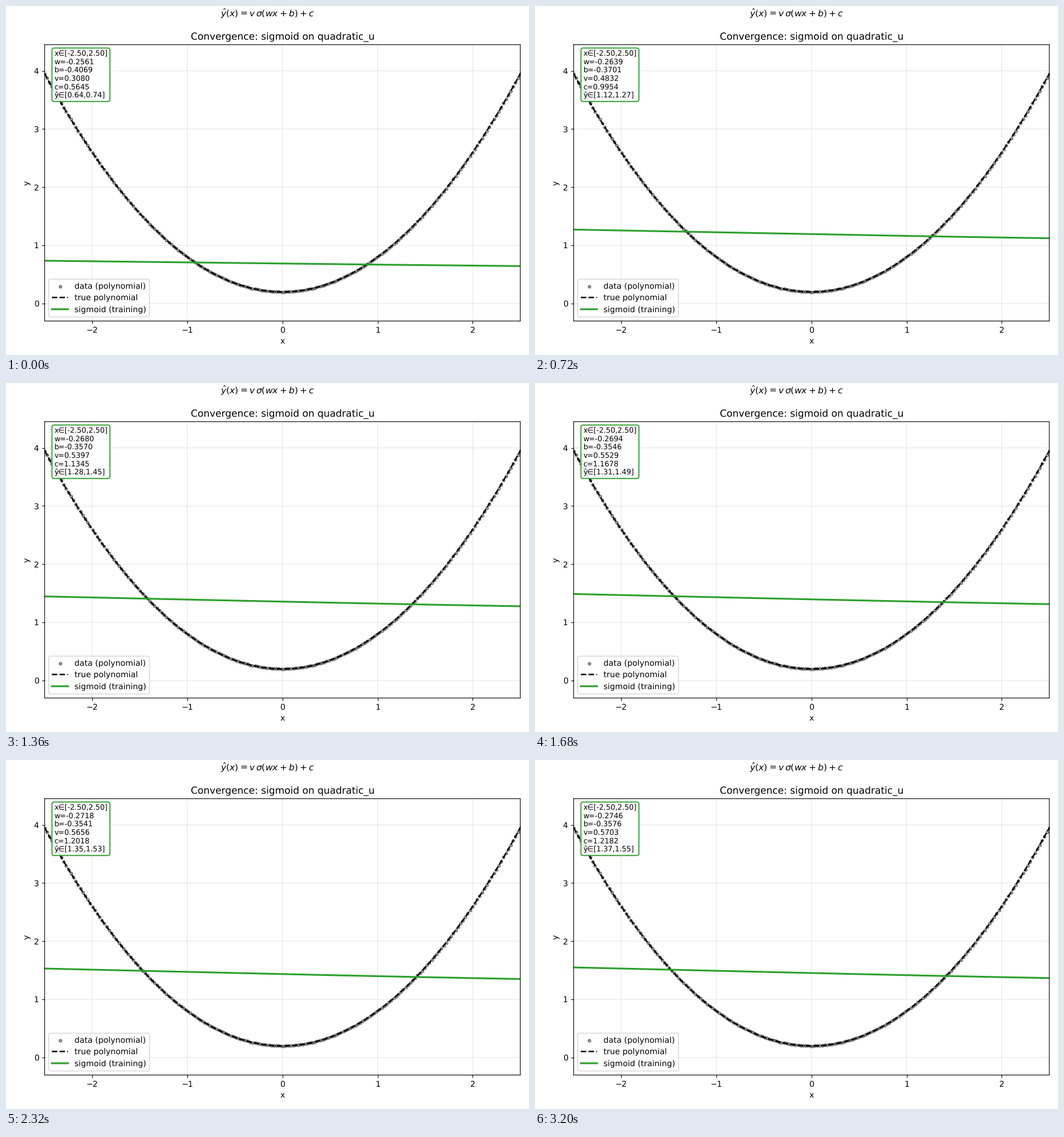
A matplotlib script for the animation above (3280 ms loop, 917 by 611 pixels).

```python
import numpy as np
import matplotlib.pyplot as plt
from matplotlib.animation import FuncAnimation

W, H = 917, 611
DPI = W / 9
FRAMES, INTERVAL = 41, 80
LR, STRIDE = 0.002, 25
START = (-0.2561, -0.4069, 0.3080, 0.5645)  # w, b, v, c
GREEN = "#2ca02c"

plt.rcParams.update({
    "font.family": "DejaVu Sans",
    "text.hinting": "none",
    "path.snap": False,
})

x = np.linspace(-2.5, 2.5, 200)
y = 0.6 * x**2 + 0.2


def sigmoid(z):
    return 1 / (1 + np.exp(-z))


def predict(p):
    w, b, v, c = p
    return v * sigmoid(w * x + b) + c


def train(start):
    """Gradient descent on the mean squared error, logged every STRIDE steps."""
    p = np.array(start)
    log = [p]
    for step in range(1, (FRAMES - 1) * STRIDE + 1):
        w, b, v, c = p
        s = sigmoid(w * x + b)
        err = v * s + c - y
        slope = err * v * s * (1 - s)
        grad = np.array([slope @ x, slope.sum(), err @ s, err.sum()])
        p = p - LR * 2 * grad / x.size
        if step % STRIDE == 0:
            log.append(p)
    return log


path = train(START)

fig = plt.figure(figsize=((W + 1e-6) / DPI, (H + 1e-6) / DPI), dpi=DPI)
left, right, top, bottom = 67.7, 901.7, 67.7, 551.5
ax = fig.add_axes([left / W, 1 - bottom / H,
                   (right - left) / W, (bottom - top) / H])
fig.text(0.5, 1 - 18 / H, r"$\hat{y}(x) = v\,\sigma(wx+b)+c$",
         ha="center", va="baseline", fontsize=11)

ax.scatter(x, y, s=12, color="black", alpha=0.4, label="data (polynomial)")
ax.plot(x, y, "--", color="black", lw=1.8, label="true polynomial")
curve, = ax.plot(x, predict(START), color=GREEN, lw=2.2,
                 label="sigmoid (training)")
ax.set(xlim=(-2.5, 2.5), ylim=(-0.3, 4.45), xlabel="x", ylabel="y",
       xticks=range(-2, 3), yticks=range(5),
       title="Convergence: sigmoid on quadratic_u")
ax.grid(True, alpha=0.3)
ax.legend(loc="lower left")

info = ax.text(0.02, 0.98, "", transform=ax.transAxes, ha="left", va="top",
               fontsize=9,
               bbox=dict(boxstyle="round,pad=0.3", facecolor="white",
                         edgecolor=GREEN, linewidth=1.5, alpha=0.9))


def update(i):
    fit = predict(path[i])
    curve.set_ydata(fit)
    rows = [f"{name}={value:.4f}" for name, value in zip("wbvc", path[i])]
    info.set_text("\n".join([f"x∈[{x[0]:.2f},{x[-1]:.2f}]", *rows,
                             f"ŷ∈[{fit.min():.2f},{fit.max():.2f}]"]))
    return curve, info


anim = FuncAnimation(fig, update, frames=FRAMES, interval=INTERVAL,
                     repeat=True, repeat_delay=0)
plt.show()
```
